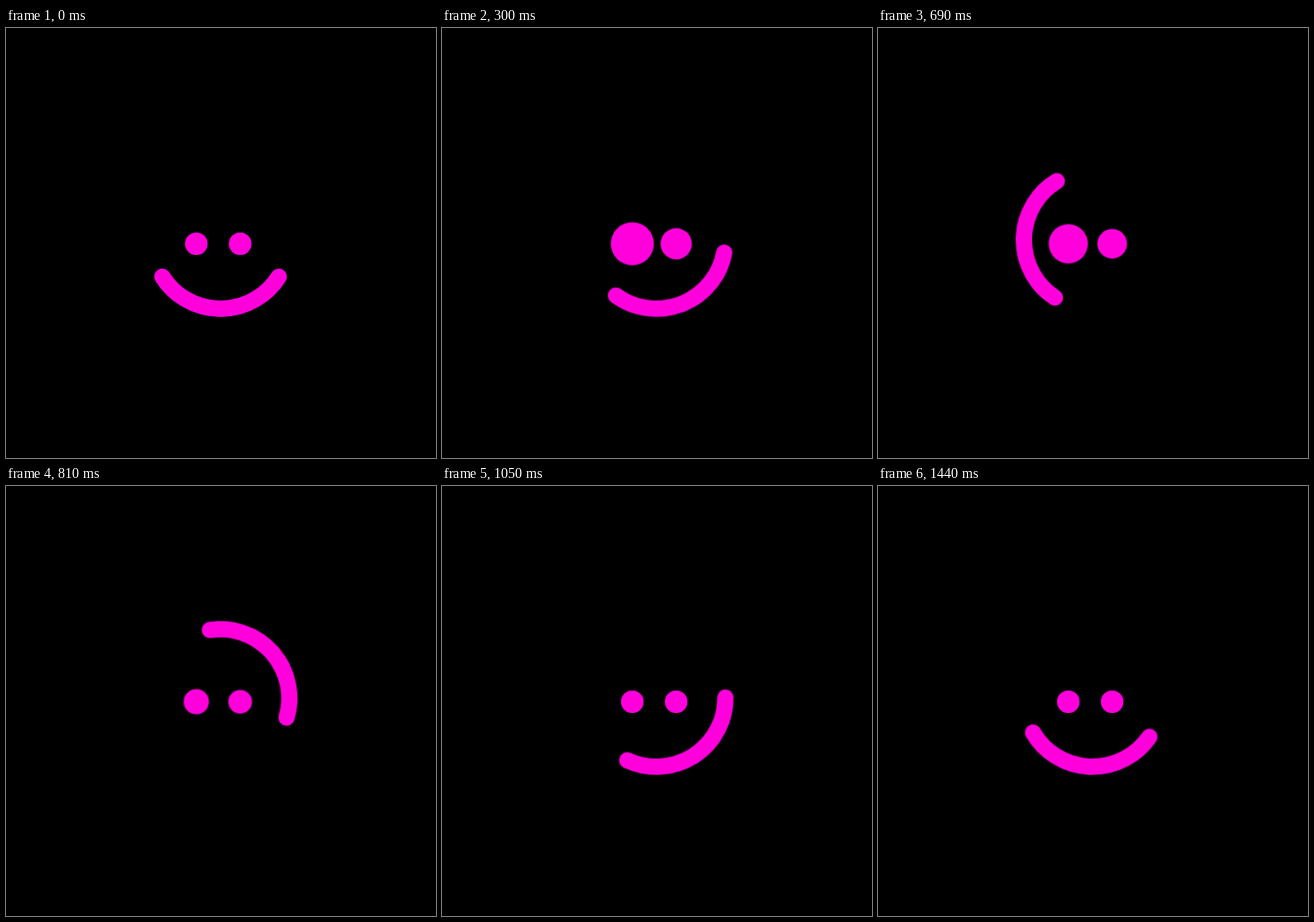
Write an HTML page that moves like this. It is 500 by 500 pixels and loops after 1830 ms.

```html
<!DOCTYPE html>
<html lang="en">
<head>
<meta charset="utf-8">
<title>Smile spin</title>
<style>
  html, body { margin: 0; width: 100%; height: 100%; overflow: hidden; background: #000; }
  svg { display: block; width: 100%; height: 100%; }

  .eye { fill: #f0d; transform-box: fill-box; transform-origin: center; animation: blink 1830ms infinite; }
  .left { --grow: 2; }
  .right { --grow: 1.42; }

  .mouth {
    fill: none; stroke: #f0d; stroke-width: 19; stroke-linecap: round;
    transform-origin: 249.5px 246.5px;
    animation: spin 1830ms infinite;
  }

  /* wind up until 540 ms, spin until 1440 ms, then rest */
  @keyframes spin {
    0% { transform: rotate(0deg); animation-timing-function: cubic-bezier(.267, 0, .01, 1); }
    29.508% { transform: rotate(-23.9deg); animation-timing-function: cubic-bezier(.267, 0, .01, 1); }
    78.689%, 100% { transform: rotate(362.1deg); }
  }

  /* grow until 540 ms, shrink until 900 ms */
  @keyframes blink {
    0% { transform: scale(1); animation-timing-function: cubic-bezier(.267, 0, .01, 1); }
    29.508% { transform: scale(var(--grow)); animation-timing-function: cubic-bezier(.6, 0, .5, 1); }
    49.18%, 100% { transform: scale(1); }
  }
</style>
</head>
<body>
<svg viewBox="0 0 500 500">
  <circle class="eye left" cx="221.3" cy="250.9" r="13.15"/>
  <circle class="eye right" cx="272.3" cy="250.9" r="13.15"/>
  <path class="mouth" d="M181.84 289.2A80 80 0 0 0 317.16 289.2"/>
</svg>
</body>
</html>
```
